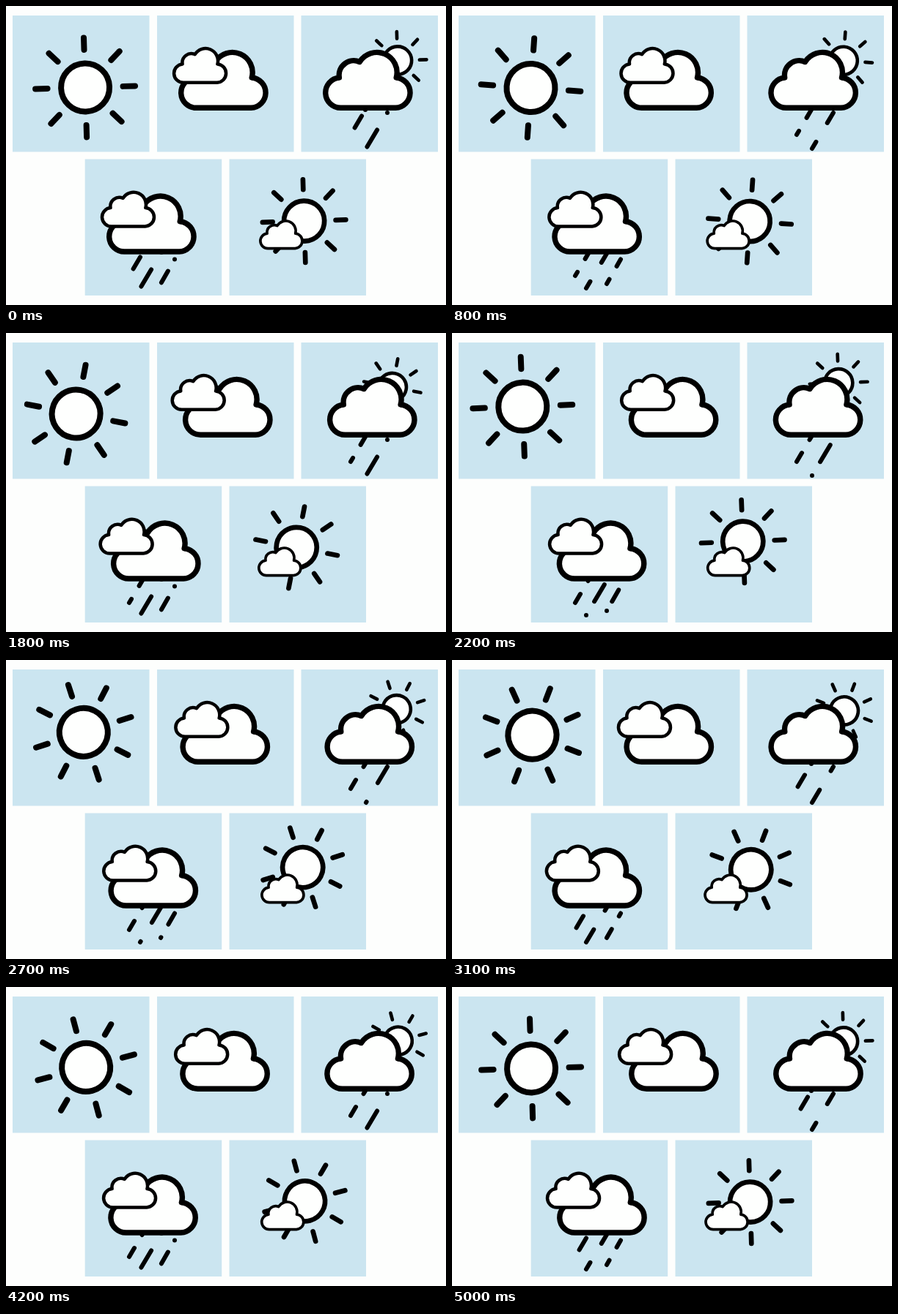
An HTML page that plays this animation: 600x409 px, repeating every 5.1 s.

```html
<!DOCTYPE html>
<html lang="en">
<head>
<meta charset="utf-8">
<title>Weather icons</title>
<style>
html, body { margin: 0; width: 100%; height: 100%; overflow: hidden; background: #fdfefd; }
svg { display: block; width: 600px; height: 409px; }
.tile { fill: #cbe5f0; }
.shape { fill: #fefffe; stroke: #000; }
.line { fill: none; stroke: #000; stroke-linecap: round; }
</style>
</head>
<body>
<svg id="stage" viewBox="0 0 600 409"></svg>
<script>
const LOOP = 5100, STEP = 100, START = 462;
const DASH = 0.47;
const stage = document.getElementById('stage');
const updates = [];

function add(parent, name, attrs) {
  const node = document.createElementNS('http://www.w3.org/2000/svg', name);
  for (const key in attrs) node.setAttribute(key, attrs[key]);
  return parent.appendChild(node);
}

const mod = (a, n) => ((a % n) + n) % n;

// CSS-style timing curve with y1 = 0 and y2 = 1
function ease(x1, x2, x) {
  let lo = 0, hi = 1;
  for (let i = 0; i < 30; i++) {
    const s = (lo + hi) / 2, r = 1 - s;
    if (3 * r * r * s * x1 + 3 * r * s * s * x2 + s * s * s < x) lo = s; else hi = s;
  }
  return lo * lo * (3 - 2 * lo);
}

// Back and forth between 0 and 1
function swing(t, period) {
  const u = mod(t - START, period) / period * 2;
  return ease(0.42, 0.58, u < 1 ? u : 2 - u);
}

function tile(x, y) {
  add(stage, 'rect', { class: 'tile', x, y, width: 186.5, height: 186.5 });
}

// The sun turns about a pivot that lies beside its centre
function sun(x, y, scale) {
  const g = add(stage, 'g');
  add(g, 'circle', { class: 'shape', r: 33, 'stroke-width': 8 });
  for (let a = 0; a < 360; a += 45) {
    add(g, 'path', { class: 'line', d: 'M51.5 0H68', 'stroke-width': 8, transform: `rotate(${a})` });
  }
  updates.push(t => {
    const turn = 360 * ease(0.4, 0.2, mod(t - START, 5000) / 5000);
    g.setAttribute('transform',
      `translate(${x} ${y}) scale(${scale}) rotate(${turn}) translate(5.7 5.6)`);
  });
}

const CLOUD = 'M-37 0A20.7 20.7 0 0 1 -39.3 -41.3A20 20 0 0 1 -11.5 -62.8' +
  'A27.5 27.5 0 0 1 38.5 -41.3A20.7 20.7 0 0 1 37.5 0Z';

// Moves from x to x + shift and back
function cloud(x, y, scale, shift, period) {
  const path = add(stage, 'path', {
    class: 'shape', d: CLOUD, 'stroke-width': 7.4, 'stroke-linejoin': 'round'
  });
  updates.push(t => path.setAttribute('transform',
    `translate(${x + shift * swing(t, period)} ${y}) scale(${scale})`));
}

const bigCloud = (x, y) => cloud(x, y, 1, 7.6, 3000);
const smallCloud = (x, y) => cloud(x, y, 0.615, -7.2, 2000);

// A dash runs down the line and wraps; a dot rests at one end
function rain(x1, y1, x2, y2, phase, period) {
  const path = add(stage, 'path', { class: 'line', 'stroke-width': 6 });
  const at = s => `${x1 + (x2 - x1) * s} ${y1 + (y2 - y1) * s}`;
  const piece = (a, b) => `M${at(a)}L${at(b)}`;
  updates.push(t => {
    const a = mod(phase + t / period, 1), b = a + DASH;
    let d = piece(a, Math.min(b, 1));
    if (b > 1) d += piece(0, b - 1);
    else d += a < 0.24 ? piece(1, 1) : piece(0, 0);
    path.setAttribute('d', d);
  });
}

const nearRain = (x, y) => rain(x, y, x - 20, y + 34, 0.25, 500);
const longRain = (x, y) => rain(x, y, x - 29, y + 49, 0.48, 600);
const shortRain = (x, y) => rain(x, y, x - 19, y + 33.5, 0.48, 600);

tile(9, 13);
tile(206, 13);
tile(402.5, 13);
tile(107.7, 209.5);
tile(304.5, 209.5);

sun(102.2, 106, 1);

bigCloud(295.2, 139.3);
smallCloud(267.9, 104.8);

sun(530.6, 71.4, 0.58);
nearRain(490, 142);
longRain(520, 146);
bigCloud(492.2, 139.3);

nearRain(188, 335);
longRain(212, 337);
shortRain(230, 346.5);
bigCloud(197.2, 336);
smallCloud(169.8, 301.5);

sun(401.7, 289.6, 0.835);
cloud(378.3, 331.6, 0.495, -6.3, 2000);

function draw(now) {
  const t = Math.floor((now % LOOP) / STEP) * STEP;
  for (const update of updates) update(t);
}

function tick() {
  draw(performance.now() - begin);
  requestAnimationFrame(tick);
}

const begin = performance.now();
draw(0);
requestAnimationFrame(tick);
</script>
</body>
</html>
```
